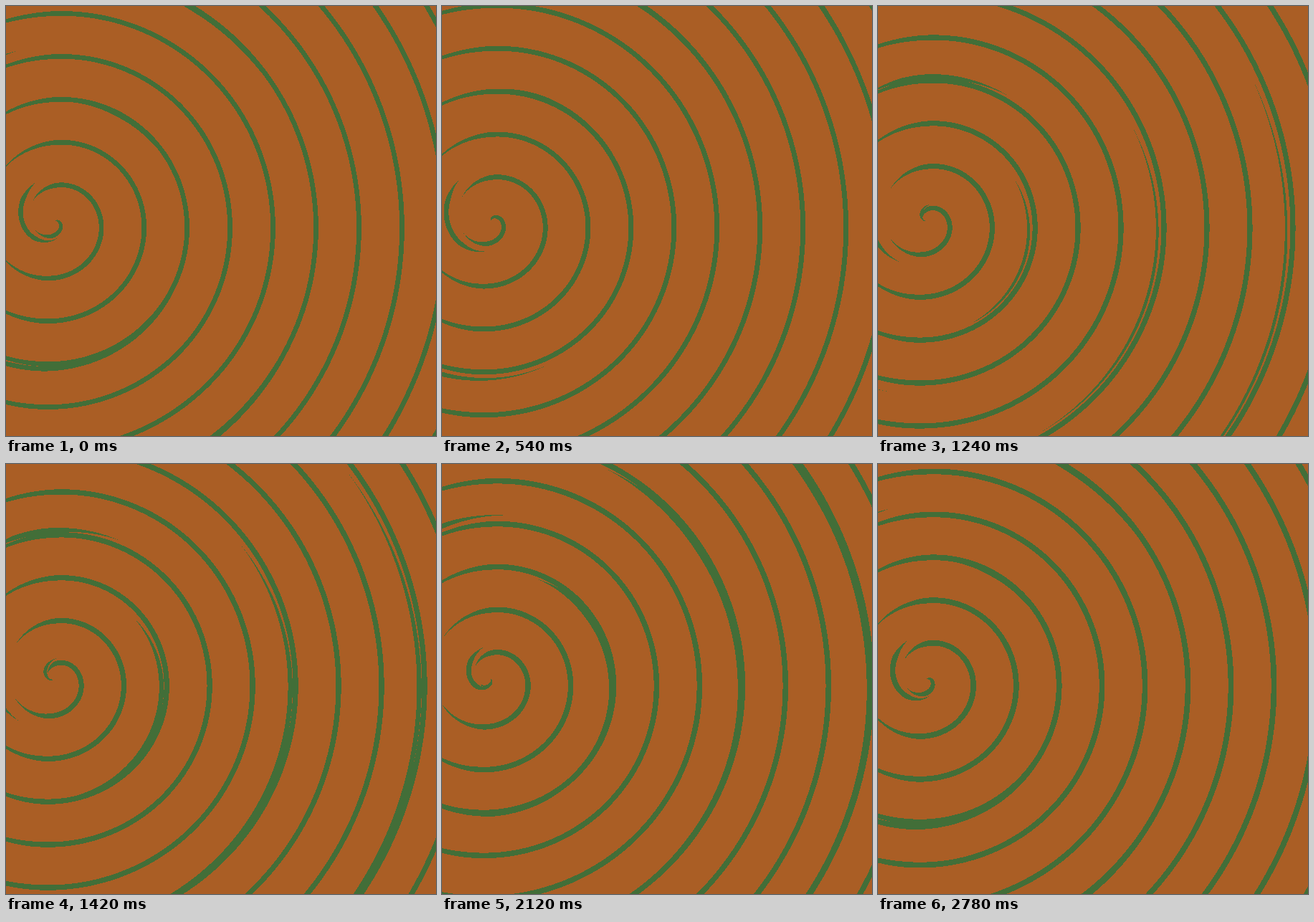
These frames come from a looping animation (600 by 600 pixels, 2800 ms). An HTML page with a canvas:

```html
<!DOCTYPE html>
<html lang="en">
<head>
<meta charset="utf-8">
<title>Spiral</title>
<style>
  html, body { margin: 0; width: 100%; height: 100%; overflow: hidden; background: #aa5e25; }
  canvas { display: block; width: 600px; height: 600px; }
</style>
</head>
<body>
<canvas id="stage" width="600" height="600"></canvas>
<script>
const SIZE = 600, LOOP = 2800, STEPS = 60, PITCH = 60;
const HUB = { x: 68, y: 300 };      // centre of the spiral
const RIPPLE = { x: 20, y: 300 };   // centre of the bands that carry the second line
const BAND = 180, START = 64.4, WIDTH = 6.7, SWELL = 0.16;
const BROWN = 0xff255eaa, GREEN = 0xff386e42;   // ABGR

const ctx = document.getElementById('stage').getContext('2d');
const image = ctx.createImageData(SIZE, SIZE);
const pixels = new Uint32Array(image.data.buffer);
const count = SIZE * SIZE;
const mainPos = new Float32Array(count), mainHalf = new Float32Array(count);
const sidePos = new Float32Array(count), sideHalf = new Float32Array(count);

const clamp = v => Math.max(0, Math.min(1, v));
const wrap = v => v - PITCH * Math.floor(v / PITCH);

// The main line fades out towards the left of the hub.
function mainWidth(deg) {
  return WIDTH * clamp(deg < 0 ? (139 + deg) / 48 : (156 - deg) / 58);
}

// The second line swells and thins again across each band.
function sideWidth(depth, band) {
  const rise = band ? 0.35 * depth : WIDTH;
  return Math.max(0, Math.min(WIDTH, rise, 0.26 * (58 - depth)));
}

// Phase along the spiral and half line width for every pixel.
function prepare() {
  for (let y = 0, i = 0; y < SIZE; y++) {
    for (let x = 0; x < SIZE; x++, i++) {
      const dx = x + 0.5 - HUB.x, dy = y + 0.5 - HUB.y;
      const r = Math.hypot(dx, dy), angle = Math.atan2(dy, dx);
      const turn = PITCH * angle / (2 * Math.PI);
      const far = Math.hypot(x + 0.5 - RIPPLE.x, y + 0.5 - RIPPLE.y);
      const band = Math.floor(far / BAND);
      mainPos[i] = wrap(r - turn - START);
      mainHalf[i] = mainWidth(angle * 180 / Math.PI) / 2;
      sidePos[i] = wrap(0.75 * r + 45 * band - turn - START);
      sideHalf[i] = 0.75 * sideWidth(far - band * BAND, band) / 2;
    }
  }
}

function near(pos, shift, half) {
  let d = Math.abs(pos - shift);
  if (d > PITCH / 2) d = PITCH - d;
  return d < half;
}

// One full turn from the first step to the last, while the lines grow a little.
function draw(step) {
  const progress = step / (STEPS - 1);
  const shift = PITCH * progress, grow = 1 + SWELL * progress;
  for (let i = 0; i < count; i++) {
    const on = near(mainPos[i], shift, mainHalf[i] * grow) ||
               near(sidePos[i], shift, sideHalf[i] * grow);
    pixels[i] = on ? GREEN : BROWN;
  }
  ctx.putImageData(image, 0, 0);
}

// Sixty steps per loop in a 20, 20, 100 ms rhythm.
function stepAt(ms) {
  const t = ms % LOOP + 20;
  const rest = t % 140;
  const part = rest < 20 ? 0 : rest < 40 ? 1 : 2;
  return (3 * Math.floor(t / 140) + part + STEPS - 1) % STEPS;
}

let shown = -1;
function tick() {
  const step = stepAt(performance.now() - begin);
  if (step !== shown) draw(shown = step);
  requestAnimationFrame(tick);
}

prepare();
const begin = performance.now();
tick();
</script>
</body>
</html>
```
